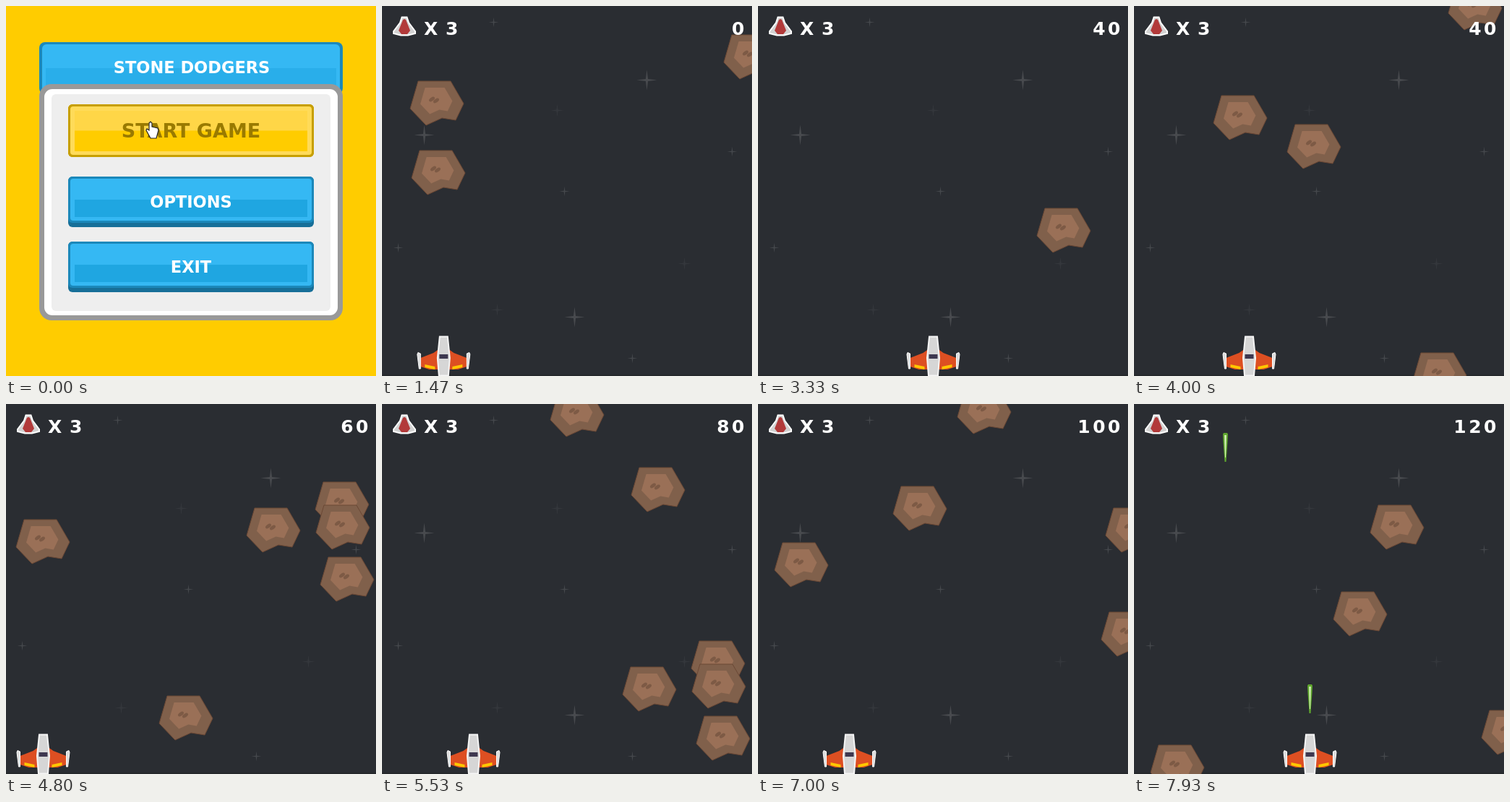
Animation, 512 px wide and 512 px high, one loop 8 s. Source, as an HTML page with a canvas:

```html
<!DOCTYPE html>
<html lang="en">
<head>
<meta charset="utf-8">
<title>Stone Dodgers</title>
<style>
  html, body { margin: 0; width: 100%; height: 100%; overflow: hidden; background: #2a2d32; }
  canvas { display: block; width: 100vw; height: 100vh; }
</style>
</head>
<body>
<canvas id="stage" width="512" height="512"></canvas>
<script>
const ctx = document.getElementById('stage').getContext('2d');
const LOOP = 8000;

// Times are in ticks of 1/15 s, speeds in pixels per tick.
const ROCK_SPEED = 20, BULLET_SPEED = 40, SHIP_SPEED = 80 / 3;
const MUZZLE_Y = 440, ROCK_REACH = 34, ROCK_DEPTH = 55;

// Left edge of each rock and the tick when its top meets the stage edge
const rocks = [
  [41, 12], [39, 16.8], [473, 20], [460, 23.6], [386, 36], [212, 51.8], [110, 53.8],
  [435, 61.4], [14, 64], [333, 64.8], [428, 66.6], [429, 65], [345, 78.6], [233, 83.8],
  [475, 90.6], [23, 95.4], [481, 97.8], [187, 99.3], [276, 106], [327, 112]
].map(([x, enter]) => ({ x, enter, hit: Infinity }));

// Ship moves: departure tick and where it goes
const moves = [
  [15.6, 59.5], [32.1, 242.5], [54, 159.5], [66, 51.5],
  [77.5, 126.5], [84, 270.5], [94, 126.5], [109.6, 243.5]
];

const bullets = [23.5, 25.6, 30.65, 61.1, 72.5, 89.6, 109, 114.2, 117.7].map(shoot);

function shipX(tick) {
  let x = 256;
  for (const [leave, goal] of moves) {
    const reach = SHIP_SPEED * Math.max(0, tick - leave);
    x += Math.max(-reach, Math.min(reach, goal - x));
  }
  return x;
}

// A bullet ends at the first rock it meets on its way up.
function shoot(fired) {
  const x = shipX(fired);
  const meet = rock => (MUZZLE_Y - ROCK_DEPTH + BULLET_SPEED * fired + ROCK_SPEED * rock.enter)
    / (BULLET_SPEED + ROCK_SPEED);
  const [target] = rocks.filter(rock => {
    const flight = meet(rock) - fired;
    return rock.hit === Infinity && Math.abs(rock.x + 37 - x) < ROCK_REACH
      && flight > 0 && flight * BULLET_SPEED < MUZZLE_Y;
  }).sort((a, b) => meet(a) - meet(b));
  if (target) target.hit = meet(target);
  return { x, fired, hit: target ? target.hit : Infinity };
}

function poly(points, fill, stroke, width = 1) {
  ctx.beginPath();
  for (let i = 0; i < points.length; i += 2) ctx.lineTo(points[i], points[i + 1]);
  ctx.closePath();
  if (fill) { ctx.fillStyle = fill; ctx.fill(); }
  if (stroke) { ctx.strokeStyle = stroke; ctx.lineWidth = width; ctx.stroke(); }
}

// A shape given by its right half and mirrored to the left
function mirrored(half, ...style) {
  const left = [];
  for (let i = half.length - 2; i >= 0; i -= 2) left.push(-half[i], half[i + 1]);
  poly([...half, ...left], ...style);
}

function box(x1, y1, x2, y2, radius, fill) {
  ctx.beginPath();
  ctx.roundRect(x1, y1, x2 - x1, y2 - y1, radius);
  ctx.fillStyle = fill;
  ctx.fill();
}

function at(x, y, draw, scaleX = 1, scaleY = 1) {
  ctx.save();
  ctx.translate(x, y);
  ctx.scale(scaleX, scaleY);
  draw();
  ctx.restore();
}

function label(text, x, y, size, color, align = 'center', spacing = 0) {
  ctx.font = `bold ${size}px "DejaVu Sans", sans-serif`;
  ctx.letterSpacing = spacing + 'px';
  ctx.textAlign = align;
  ctx.fillStyle = color;
  ctx.fillText(text, x, y);
}

function button(y, height, text, size, baseline, c) {
  box(86, y, 426, y + height + c.depth, 6, c.shade);
  box(86, y, 426, y + height, 6, c.border);
  box(89, y + 3, 423, y + height - 3, 4, c.light);
  box(95, y + 9, 417, y + height - 8, 0, c.gloss);
  box(95, y + height / 2, 417, y + height - 8, 0, c.fill);
  label(text, 256, baseline, size, c.text);
}

function drawMenu() {
  const blue = { depth: 6, shade: '#176f98', border: '#1b88ba', light: '#35b8f3', gloss: '#35b8f3', fill: '#1fa6e1', text: '#fff' };
  const yellow = { depth: 0, shade: '#c79f00', border: '#c79f00', light: '#ffdb59', gloss: '#ffd647', fill: '#ffcc00', text: '#997a00' };
  box(0, 0, 512, 512, 0, '#ffcc00');
  box(46, 50, 466, 122, 8, '#1b88ba');
  box(50, 53, 462, 122, 6, '#35b8f3');
  box(55, 86, 457, 122, 0, '#29aeea');
  box(46, 108, 466, 435, 17, '#999');
  box(53, 115, 459, 428, 11, '#fff');
  box(63, 122, 449, 422, 6, '#eee');
  label('STONE DODGERS', 257, 93, 22.5, '#fff');
  button(136, 73, 'START GAME', 27, 182, yellow);
  button(236, 64, 'OPTIONS', 22.5, 278.5, blue);
  button(326, 64, 'EXIT', 22.5, 368.5, blue);
  poly([198, 162, 200, 160, 202, 162, 202, 167, 210, 169, 211, 172, 208, 183,
    200, 183, 194, 172, 195, 170, 198, 172], '#fff', '#222', 1.2);
}

function star(x, y, radius, alpha) {
  const points = [];
  for (let i = 0; i < 8; i++) {
    const r = i % 2 ? radius * .16 : radius, angle = i * Math.PI / 4;
    points.push(x + r * Math.cos(angle), y + r * Math.sin(angle));
  }
  ctx.globalAlpha = alpha;
  poly(points, '#fff');
  ctx.globalAlpha = 1;
}

function drawSky() {
  box(0, 0, 512, 512, 0, '#2a2d32');
  box(0, 510, 512, 512, 0, '#25282c');
  for (const [x, y] of [[58, 178], [366, 102], [266, 430]]) star(x + .5, y + .5, 14, .14);
  for (const [x, y] of [[154, 22], [252, 256], [484, 201], [22, 334], [346, 487]]) star(x + .5, y + .5, 7, .13);
  for (const [x, y] of [[242, 144], [418, 356], [159, 420]]) star(x + .5, y + .5, 9, .05);
}

function drawRock() {
  const outline = [11, 0, 56, 0, 74, 31, 63, 54, 44, 51, 22, 61, 0, 38];
  poly(outline, '#80604b', '#6b4835');
  at(14, 9, () => poly(outline, '#9a7057'), .6, .6);
  for (const [x, y] of [[30, 25], [36, 27]]) {
    ctx.beginPath();
    ctx.ellipse(x, y, 4.5, 2.4, -.6, 0, 2 * Math.PI);
    ctx.fillStyle = '#7d5a45';
    ctx.fill();
  }
}

function drawBullet() {
  mirrored([2.5, 0, 3.5, 2, 3, 12, 1, 40], '#5fa62e');
  mirrored([1.3, 3, 1, 16, .4, 34], '#d6f2ba');
}

function drawShip() {
  for (const side of [-1, 1]) {
    at(0, 0, () => {
      poly([7, 475, 14, 480, 32, 487, 32, 499, 20, 503, 7, 503], '#dd4f22');
      poly([12, 499, 26, 496, 26, 500, 12, 503], '#ffc800');
      poly([32, 481, 35.5, 479.5, 36.5, 482, 34, 502, 32, 502], '#dcdcdc', '#fff');
    }, side);
  }
  mirrored([5.5, 457.5, 8.5, 487, 6.5, 511.5], '#d6d6d6', '#f6f6f6', 2);
  box(-6, 482, 6, 488, 0, '#3e3850');
}

function drawLife() {
  mirrored([3.5, 15.5, 6, 23, 15, 35, 15, 38, 5, 40.5], '#d2d2d2', '#fff', 2);
  mirrored([0, 18, 2, 19, 8, 34, 4, 39], '#b23a3a');
}

function drawGame(tick) {
  drawSky();
  if (tick < 3) return;
  for (const { x, fired, hit } of bullets) {
    if (tick >= fired && tick < hit) at(x, MUZZLE_Y - BULLET_SPEED * (tick - fired), drawBullet);
  }
  at(shipX(tick), 0, drawShip);
  for (const { x, enter, hit } of rocks) {
    const y = Math.round(ROCK_SPEED * (tick - enter));
    if (y > -30 && y < 512 && tick < hit) at(x, y, drawRock);
  }
  at(31, 0, drawLife);
  label('X 3', 58, 40, 25, '#fff', 'left', 1);
  label(20 * rocks.filter(rock => tick >= rock.hit).length, 505, 40, 25, '#fff', 'right', 3.5);
}

function render(now) {
  const t = now % LOOP, rest = t % 200;
  const tick = Math.floor(t / 200) * 3 + (rest >= 130 ? 2 : rest >= 70 ? 1 : 0);
  if (tick < 1) drawMenu();
  else drawGame(tick);
}

const start = performance.now();
function loop() {
  render(performance.now() - start);
  requestAnimationFrame(loop);
}
loop();
</script>
</body>
</html>
```
